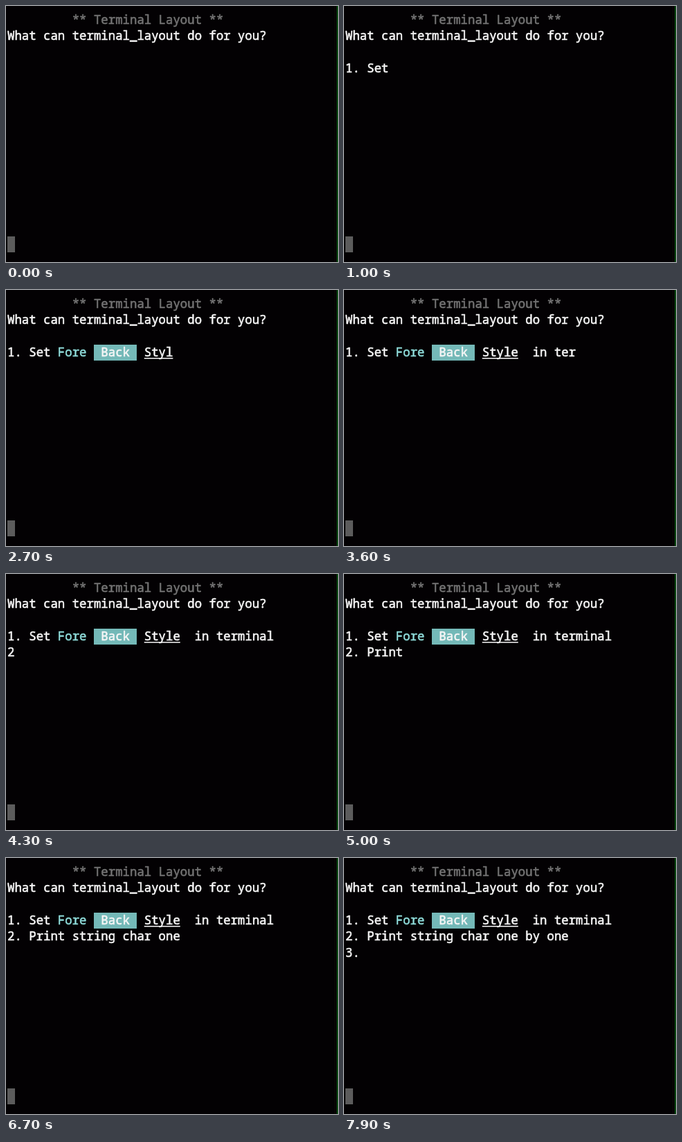
Write an HTML page with a canvas that moves like this. It is 480 px wide and 370 px high and loops after 8000 ms.

```html
<!DOCTYPE html>
<html lang="en">
<head>
<meta charset="utf-8">
<title>Terminal typing</title>
<style>
  html, body { margin: 0; width: 100%; height: 100%; overflow: hidden; background: #030103; }
  canvas { display: block; }
</style>
</head>
<body>
<canvas id="stage" width="480" height="370"></canvas>
<script>
const ctx = document.getElementById('stage').getContext('2d');
const LOOP = 8000, STEP = 100;
const LEFT = 2, CELL = 10.41, TOP = 26, LINE = 23.3;
const WHITE = '#f6f6f6', GRAY = '#737373', CYAN = '#8edbd9', TEAL = '#74b9b8';

// Each run types one character per step, beginning at `start`.
const runs = [
  { row: 0, col: 9, text: '** Terminal Layout **', color: GRAY },
  { row: 1, col: 0, text: 'What can terminal_layout do for you?' },
  { row: 3, col: 0, text: '1. Set', start: 500 },
  { row: 3, col: 7, text: 'Fore', start: 1300, color: CYAN },
  { row: 3, col: 12, text: ' Back ', start: 1800, fill: TEAL },
  { row: 3, col: 19, text: 'Style', start: 2400, underline: true },
  { row: 3, col: 26, text: 'in', start: 3000 },
  { row: 3, col: 29, text: 'terminal', start: 3400 },
  { row: 4, col: 0, text: '2. Print string char one by one', start: 4300 },
  { row: 5, col: 0, text: '3.', start: 7800 }
];

// A thin outline gives the regular face a medium weight.
function drawChar(char, x, y) {
  ctx.fillText(char, x, y);
  ctx.strokeText(char, x, y);
}

function drawRun(run, time) {
  const { row, col, text, start, color = WHITE, fill, underline } = run;
  const typed = start === undefined ? text.length : Math.floor((time - start) / STEP) + 1;
  const count = Math.max(0, Math.min(text.length, typed));
  if (!count) return;

  const x = LEFT + col * CELL;
  const y = TOP + row * LINE;
  const width = count * CELL;
  if (fill) {
    ctx.fillStyle = fill;
    ctx.fillRect(Math.round(x), 79, Math.round(width), 23);
  }
  ctx.fillStyle = ctx.strokeStyle = color;
  for (let i = 0; i < count; i++) drawChar(text[i], x + i * CELL, y);
  if (underline) ctx.fillRect(x, 98, width, 1.5);
}

function draw(time) {
  ctx.fillStyle = '#030103';
  ctx.fillRect(0, 0, 480, 370);

  // Window edge
  ctx.fillStyle = '#0c0605';
  ctx.fillRect(475, 0, 1, 370);
  ctx.fillStyle = '#07420d';
  ctx.fillRect(478, 0, 2, 370);

  ctx.font = '17.35px "Noto Sans Mono", "DejaVu Sans Mono", monospace';
  ctx.textBaseline = 'alphabetic';
  ctx.lineWidth = 0.6;
  ctx.lineJoin = 'round';
  for (const run of runs) drawRun(run, time);

  // Cursor
  ctx.fillStyle = '#5c5c5c';
  ctx.fillRect(2, 333, 11, 23);
}

const origin = performance.now();
function frame() {
  draw((performance.now() - origin) % LOOP);
  requestAnimationFrame(frame);
}
frame();
</script>
</body>
</html>
```
